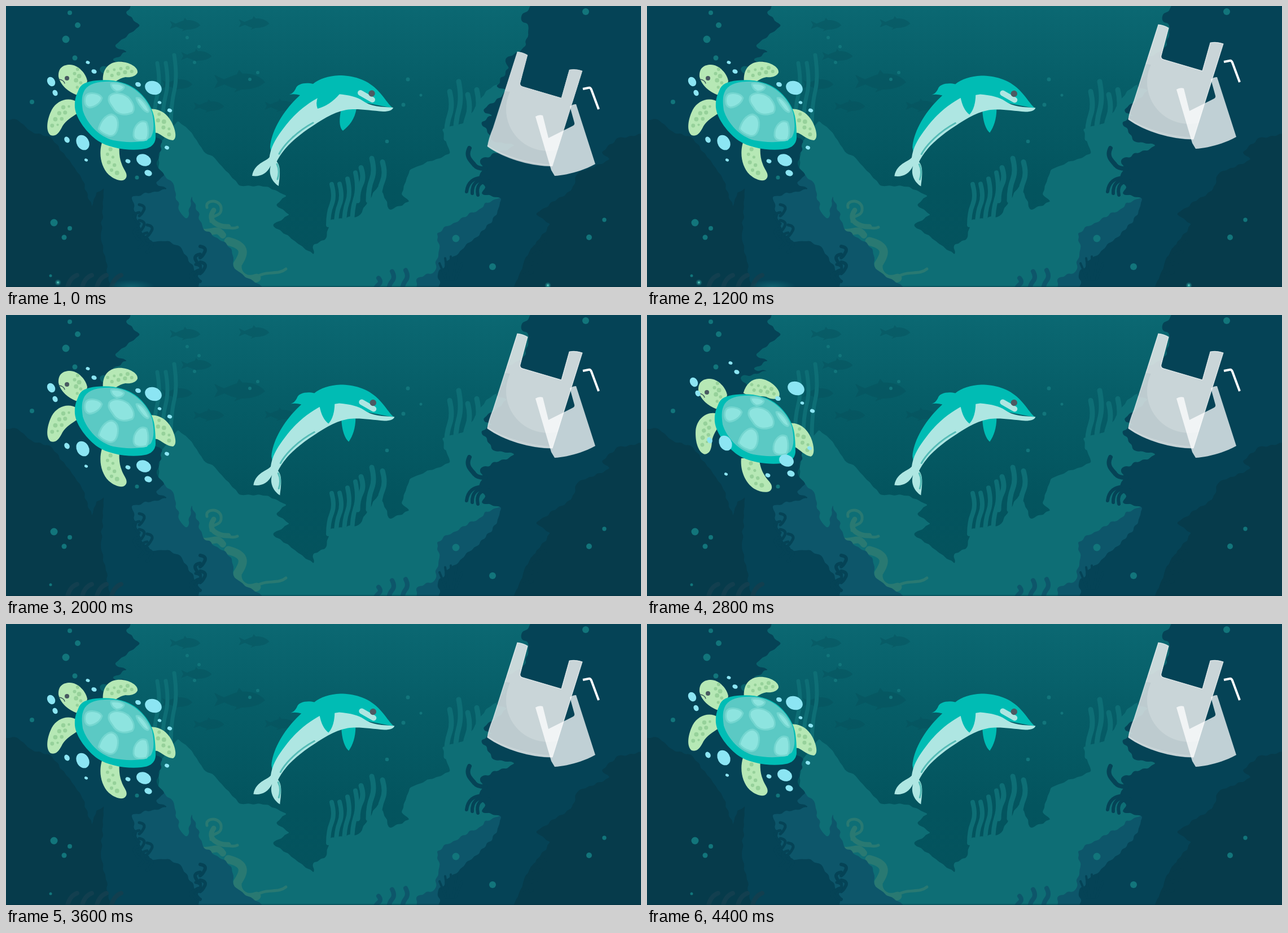
An HTML page that plays this animation: 1125x498 px, repeating every 4800 ms.

```html
<!DOCTYPE html>
<html lang="en">
<head>
<meta charset="utf-8">
<title>Reef</title>
<style>
html, body { margin: 0; width: 100%; height: 100%; overflow: hidden; background: #05434f; }
svg { display: block; width: 100vw; height: 100vh; }
.weed { fill: none; stroke-linecap: round; stroke-linejoin: round; }
</style>
</head>
<body>
<svg viewBox="0 0 1125 498" preserveAspectRatio="none">
  <defs>
    <linearGradient id="water" x1="0" y1="0" x2="0" y2="1">
      <stop offset="0" stop-color="#0b6872"/>
      <stop offset=".3" stop-color="#065d67"/>
      <stop offset=".65" stop-color="#03545e"/>
      <stop offset="1" stop-color="#04525d"/>
    </linearGradient>
    <radialGradient id="halo">
      <stop offset="0" stop-color="#8ff5e2"/>
      <stop offset=".3" stop-color="#2fa8a4" stop-opacity=".75"/>
      <stop offset="1" stop-color="#16808a" stop-opacity="0"/>
    </radialGradient>
    <radialGradient id="mist">
      <stop offset="0" stop-color="#168089" stop-opacity=".5"/>
      <stop offset="1" stop-color="#168089" stop-opacity="0"/>
    </radialGradient>
    <path id="sack" d="M906 81Q916 82 924 87L911 136Q910 142 916 143L984 163L998 113Q1010 111 1021 115L968 284C930 284 882 270 853 249Q855 235 863 216Z"/>
    <clipPath id="sackClip"><use href="#sack"/></clipPath>
  </defs>

  <rect width="1125" height="498" fill="url(#water)"/>
  <g id="fish" fill="#064f5a" opacity=".4"></g>
  <g id="land"></g>
  <g id="dots" fill="#12757b"></g>
  <rect y="496" width="1125" height="2" fill="#04333f" opacity=".4"/>

  <g id="glow">
    <circle cx="92" cy="490" r="6" fill="url(#halo)"/>
    <circle cx="960" cy="495" r="6" fill="url(#halo)"/>
  </g>
  <ellipse id="haze" cx="222" cy="498" rx="42" ry="13" fill="url(#mist)"/>

  <g id="turtle">
    <g id="finTop">
      <path fill="#b6e8b5" d="M172 135C170 115 179 101 197 99C215 97 235 108 233 118C230 125 220 127 212 126C202 128 196 132 191 137Z"/>
    </g>
    <g id="finLeft">
      <path fill="#b6e8b5" d="M127 171C112 160 91 166 81 184C72 202 70 222 79 229C90 233 96 221 100 213C106 203 116 197 127 190Z"/>
    </g>
    <g id="finRight">
      <path fill="#b6e8b5" d="M253 183C270 180 285 190 293 205C301 220 303 235 296 238C286 238 275 228 268 225L258 224Z"/>
    </g>
    <g id="finBack">
      <path fill="#b6e8b5" d="M170 242C164 262 168 285 182 299C195 310 209 313 213 304C216 296 208 290 205 280C201 270 200 260 201 246Z"/>
    </g>
    <g id="head">
      <path fill="#b6e8b5" d="M93 125C92 110 101 104 113 104C128 104 142 120 144 133C141 146 133 154 126 158C110 152 96 140 93 125Z"/>
      <circle cx="108" cy="128" r="4" fill="#485961"/>
      <path d="M94 130Q102 131 104 137" fill="none" stroke="#3c5a5e" stroke-width="1.4" stroke-linecap="round"/>
    </g>
    <path fill="#00bdb5" d="M128 150C132 138 142 134 160 132C190 129 213 136 228 146C249 161 261 184 263 200C265 215 265 225 265 234C264 246 255 253 240 254C214 257 181 251 163 239C144 226 124 200 122 180C121 165 125 157 128 150Z"/>
    <path fill="#5bc9c4" d="M140 148C148 137 165 133 190 134C221 136 250 160 259 190C263 212 262 222 257 232C248 243 215 243 190 238C165 232 143 208 136 185C133 165 135 156 140 148Z"/>
    <g fill="#8de4df" stroke="#75d6d0" stroke-width="3" stroke-linejoin="round">
      <path d="M142 158C148 152 166 154 170 163C168 172 158 179 148 180C138 178 138 165 142 158Z"/>
      <path d="M183 160C190 152 205 153 217 162C226 172 229 182 224 189C210 195 196 193 189 180C183 172 180 167 183 160Z"/>
      <path d="M164 218C167 205 176 193 187 192C195 194 200 201 198 215C196 227 190 232 182 230C173 227 168 224 164 218Z"/>
      <path d="M226 230C225 212 238 200 249 206C253 215 253 230 249 237C242 239 228 241 226 230Z"/>
      <path d="M186 138C193 136 204 138 209 143C209 148 202 152 195 151C189 148 186 143 186 138Z"/>
      <path d="M231 163C238 161 249 173 253 185C253 190 248 188 243 183C237 176 232 170 231 163Z"/>
    </g>
  </g>
  <g id="loose" fill="#8ce5f3"></g>
  <g id="close" fill="#8ce5f3"></g>

  <g id="dolphin">
    <path id="finFar" fill="#00bcb4"/>
    <path fill="#aee6e2" d="M469 264C467 275 440 276 436 301C450 303 462 298 469 283C464 299 473 313 483 319C485 302 488 284 479 275Z"/>
    <path fill="#00bcb4" d="M686 181C679 177 670 161 657 148C638 129 613 123 590 123C571 124 555 129 544 138C532 135 516 137 513 147Q509 155 502 157Q511 155 521 158C493 183 470 220 468 250L470 262L560 185L640 172Z"/>
    <path fill="#aee6e2" d="M466 274C468 248 480 232 496 211C514 188 535 172 556 161L588 156C609 158 622 161 632 168C645 178 666 179 686 180Q684 187 668 187C645 185 621 181 603 184C577 189 558 203 535 218C508 237 489 255 478 279Z"/>
    <path fill="none" stroke="#55bcb7" stroke-width="3" stroke-linecap="round" d="M544 207C516 222 493 245 484 262M480 280Q486 292 481 307"/>
    <path id="finNear" fill="#00bcb4"/>
    <path d="M628 154L649 166" stroke="#aee6e2" stroke-width="10" stroke-linecap="round"/>
    <circle cx="648" cy="155" r="5.7" fill="#4d5962"/>
  </g>

  <g id="litter">
    <g opacity=".88">
      <use href="#sack" fill="#d7dee0"/>
      <g clip-path="url(#sackClip)" fill="#e5eaea">
        <circle cx="960" cy="183" r="74"/>
        <path d="M880 150V70H1030V175Z"/>
      </g>
    </g>
    <path d="M853 247C882 268 930 280 968 282" fill="none" stroke="#d7e1e3" stroke-width="1.5" opacity=".7"/>
    <use id="rim" href="#sack" fill="none" stroke="#fff" stroke-width="1.2"/>
    <path fill="#fff" fill-opacity=".75" d="M938 196Q944 192 951 194L961 234L1003 213Q1008 211 1007 207L999 178Q1004 174 1010 174L1044 280C1021 293 991 300 972 301L966 291Z"/>
    <path d="M1022 147L1032 145Q1035 144 1037 148L1050 183" fill="none" stroke="#fff" stroke-width="4"/>
  </g>
</svg>

<script>
const $ = id => document.getElementById(id);
const add = (id, html) => $(id).insertAdjacentHTML('beforeend', html);
const points = s => s.split(' ').map(p => p.split(',').map(Number));

function random(seed) {
  seed *= 7919;
  return () => (seed = (seed * 16807) % 2147483647) / 2147483647;
}

// Turns a few key points into a softly ragged closed path.
function ragged(text, seed, amp) {
  const pts = points(text), rnd = random(seed), fine = [];
  pts.forEach(([x, y], i) => {
    const [u, v] = pts[(i + 1) % pts.length];
    const len = Math.hypot(u - x, v - y);
    const n = Math.ceil(len / 9);
    for (let k = 0; k < n; k++) {
      const off = k ? (k % 2 ? 1 : -1) * rnd() * amp : 0;
      fine.push([x + (u - x) * k / n - (v - y) / len * off,
                 y + (v - y) * k / n + (u - x) / len * off]);
    }
  });
  const join = ([x, y], i) => {
    const [u, v] = fine[(i + 1) % fine.length];
    const mid = `${(x + u) / 2} ${(y + v) / 2}`;
    return i ? `Q${x} ${y} ${mid}` : 'M' + mid;
  };
  return fine.map(join).join('') + 'Z';
}

function rock(fill, text, seed, amp) {
  add('land', `<path fill="${fill}" d="${ragged(text, seed, amp)}"/>`);
}

function weed(color, width, d) {
  add('land', `<path class="weed" stroke="${color}" stroke-width="${width}" d="${d}"/>`);
}

// A row of gently bent stalks whose tips differ in height.
function stalks(color, x, gap, count, top, low, width) {
  const rnd = random(x);
  for (let i = 0; i < count; i++, x += gap) {
    const tip = top + (rnd() - .5) * 30, h = low - tip;
    weed(color, width, `M${x} ${tip}q6 ${h * .3} 0 ${h * .5}t-6 ${h * .5}`);
  }
}

// A vertical dark frond made of repeated curls.
function frond(color, x, y, count, width) {
  for (let i = 0; i < count; i++) {
    const side = i % 2 ? -1 : 1;
    weed(color, width, `M${x} ${y + i * 14}q${side * 12} 2 ${side * 8} 10t${-side * 8} 10`);
  }
}

const TEAL = '#0e6e75', BLUE = '#0d566a', DARK = '#054356', DEEP = '#063b4b', CORAL = '#297972';

points('318,33 440,30 338,88 415,133 304,138 360,177 486,176').forEach(([x, y], i) =>
  add('fish', `<path transform="translate(${x} ${y}) scale(${i === 3 ? 1 : .6})" d="M44 2C34-11 16-14 4-13L-2-20L-6-12Q-18-8-29-3L-46-11L-40 1L-46 13L-28 6Q-16 12-6 14L-11 20L3 15Q30 15 44 2Z"/>`));

stalks(TEAL, 268, 15, 3, 98, 215, 7);
stalks(TEAL, 577, 14, 4, 308, 388, 8);
stalks(TEAL, 629, 19, 3, 272, 345, 9);
stalks(TEAL, 786, 16, 4, 145, 235, 9);

rock(TEAL, '262,500 270,285 275,240 305,203 330,225 350,258 372,272 412,318 465,320 498,337 478,352 503,370 472,388 545,441 545,422 565,415 575,378 625,372 660,318 680,362 715,347 700,333 715,290 787,262 772,218 812,208 850,150 890,130 915,300 900,500', 11, 2.5);

weed(CORAL, 5, 'M356 357C352 341 384 342 381 362C379 375 362 369 363 382');
weed(CORAL, 9, 'M368 362C354 382 378 392 394 391');
weed(CORAL, 12, 'M344 400C368 405 372 390 384 406');
weed(CORAL, 15, 'M394 417C430 426 420 442 410 458C408 482 430 488 444 482');
weed(CORAL, 5, 'M388 391Q402 396 410 392M438 484C460 466 480 479 496 466');

rock(BLUE, '200,300 265,288 298,318 308,365 320,378 330,336 348,392 400,430 404,465 455,500 200,500', 5, 4);
rock(BLUE, '725,500 731,480 760,470 768,430 763,402 838,360 848,348 878,339 900,500', 9, 4);
stalks(BLUE, 660, 24, 3, 470, 505, 8);

rock(DARK, '-20,-20 238,-20 212,10 238,35 192,70 215,82 188,95 214,100 165,110 230,210 278,240 268,285 281,300 265,313 286,325 222,338 240,400 256,418 290,416 312,430 340,475 346,520 -20,520', 21, 4);
rock(DARK, '1145,-20 945,-20 912,22 926,38 922,70 884,95 892,110 868,141 888,150 845,184 862,195 842,205 860,238 902,247 840,272 846,290 838,305 850,322 842,333 878,341 870,370 825,418 785,450 765,475 772,520 1145,520', 33, 4);

weed(DARK, 8, 'M821 252C813 268 826 276 830 282Q836 289 850 288');
for (let i = 0; i < 3; i++)
  weed(DARK, 6, `M${844 + 6 * i} ${304 + 3 * i}q-25 1 -${28 - 4 * i} 25`);
for (let a = -2; a <= 2; a++)
  weed(DARK, 4, `M${788 + a * 4} 485L${788 + a * 10} ${444 + a * a * 3}`);
frond(DARK, 236, 352, 5, 5);
frond(DARK, 250, 388, 3, 5);
frond(DARK, 344, 426, 4, 6);
frond(DARK, 336, 458, 2, 5);

rock(DEEP, '-20,200 20,201 45,222 82,235 132,300 152,356 160,330 174,322 168,410 190,520 -20,520', 45, 3);
rock(DEEP, '1145,225 1090,232 1055,258 1070,272 1012,298 1002,327 938,368 965,386 918,452 902,520 1145,520', 51, 4);

for (let i = 0; i < 4; i++) {
  weed(DEEP, 6, `M${956 - 8 * i} ${418 + 18 * i}q-24 4 -30 30`);
  weed('#123f4f', 8, `M${108 + 26 * i} 502q4 -20 18 -25`);
}

points('106,59,6.5 127,34,5 113,12,4 122,92,4.5 46,170,4 85,384,6.5 113,394,4 103,410,4.5 79,478,2.5 232,304,3.5 321,56,3 342,72,3 334,100,3 446,118,3 432,130,3 712,130,3.5 735,158,2.5 704,175,3.5 675,240,3.3 797,412,6.5 862,462,6 1027,10,6 1060,379,3.7 1033,410,5')
  .forEach(([x, y, r]) => add('dots', `<circle cx="${x}" cy="${y}" r="${r}"/>`));

// Scatters spots on both sides of a line inside a limb.
function spots(id, x, y, u, v, count, spread) {
  const rnd = random(count + x);
  const len = Math.hypot(u - x, v - y);
  for (let i = 0; i < count; i++) {
    const k = i / (count - 1), off = (i % 2 ? 1 : -1) * spread * (.6 + rnd() * .4);
    const cx = x + (u - x) * k - (v - y) / len * off;
    const cy = y + (v - y) * k + (u - x) / len * off;
    add(id, `<circle cx="${cx}" cy="${cy}" r="${2 + rnd() * 2}" fill="#96d19a"/>`);
  }
}
spots('finTop', 181, 120, 222, 112, 8, 5);
spots('finLeft', 108, 176, 85, 214, 8, 6);
spots('finRight', 268, 194, 291, 226, 6, 4);
spots('finBack', 181, 255, 192, 297, 7, 5);
spots('head', 123, 113, 130, 143, 6, 4);

// Bubbles are ovals that grow narrower one way, each with its own tilt.
function bubbles(id, text) {
  points(text).forEach(([x, y, r]) =>
    add(id, `<ellipse cx="${x}" cy="${y}" rx="${r * 1.13}" ry="${r * .87}" transform="rotate(${(x > 140 ? 22 : 60)} ${x} ${y})"/>`));
}
bubbles('loose', '80,134,7.7 87,154,4.9 145,100,3.2 156,116,4.2 261,145,13.5 272,171,3 290,185,3.8 285,251,3.6 244,273,11.8 252,296,6 136,242,12.4 108,237,5.1');
bubbles('close', '234,139,4.5 216,275,4 142,273,2.8');

const STEP = 400, COUNT = 12;
const FAR = ['M594 182C590 200 590 216 597 221C608 212 618 201 621 181Z',
             'M592 182C592 202 598 219 605 224C612 214 617 200 617 182Z'];
const NEAR = ['M553 160Q548 172 552 182Q574 176 591 156L570 150Z',
              'M553 160Q557 183 569 192Q580 180 580 155L565 150Z'];

const shift = (id, x, y) => $(id).setAttribute('transform', `translate(${x} ${y})`);
const turn = (id, a, x, y) => $(id).setAttribute('transform', `rotate(${a} ${x} ${y})`);
const fade = (id, v) => $(id).setAttribute('opacity', v);

function draw(ms) {
  const i = Math.floor(ms / STEP) % COUNT;
  const odd = i % 2;
  const swim = i % 3 === 1 ? 1 : 0;
  const lift = i % 3 === 2 && i > 2 ? -5 : 0;
  const bright = i === 0 || i === 3;

  shift('turtle', -2 * swim, 9 * swim + lift);
  shift('close', -2 * swim, 9 * swim + lift);
  shift('loose', 3 * swim, -15 * swim + lift);
  turn('finTop', 22 * swim, 187, 134);
  turn('finLeft', -23 * swim, 113, 172);
  turn('finRight', 6 * swim, 259, 202);
  turn('finBack', -11 * swim, 185, 249);

  shift('dolphin', 2.3 * odd, .5 * odd);
  $('finFar').setAttribute('d', FAR[odd]);
  $('finNear').setAttribute('d', NEAR[odd]);

  shift('litter', 0, -48 * odd);
  fade('rim', odd ? .6 : .2);
  fade('glow', bright ? 1 : odd ? 0 : .4);
  fade('haze', bright ? 1 : 0);
}

const start = performance.now();
function tick() {
  draw(performance.now() - start);
  requestAnimationFrame(tick);
}
draw(0);
requestAnimationFrame(tick);
</script>
</body>
</html>
```
